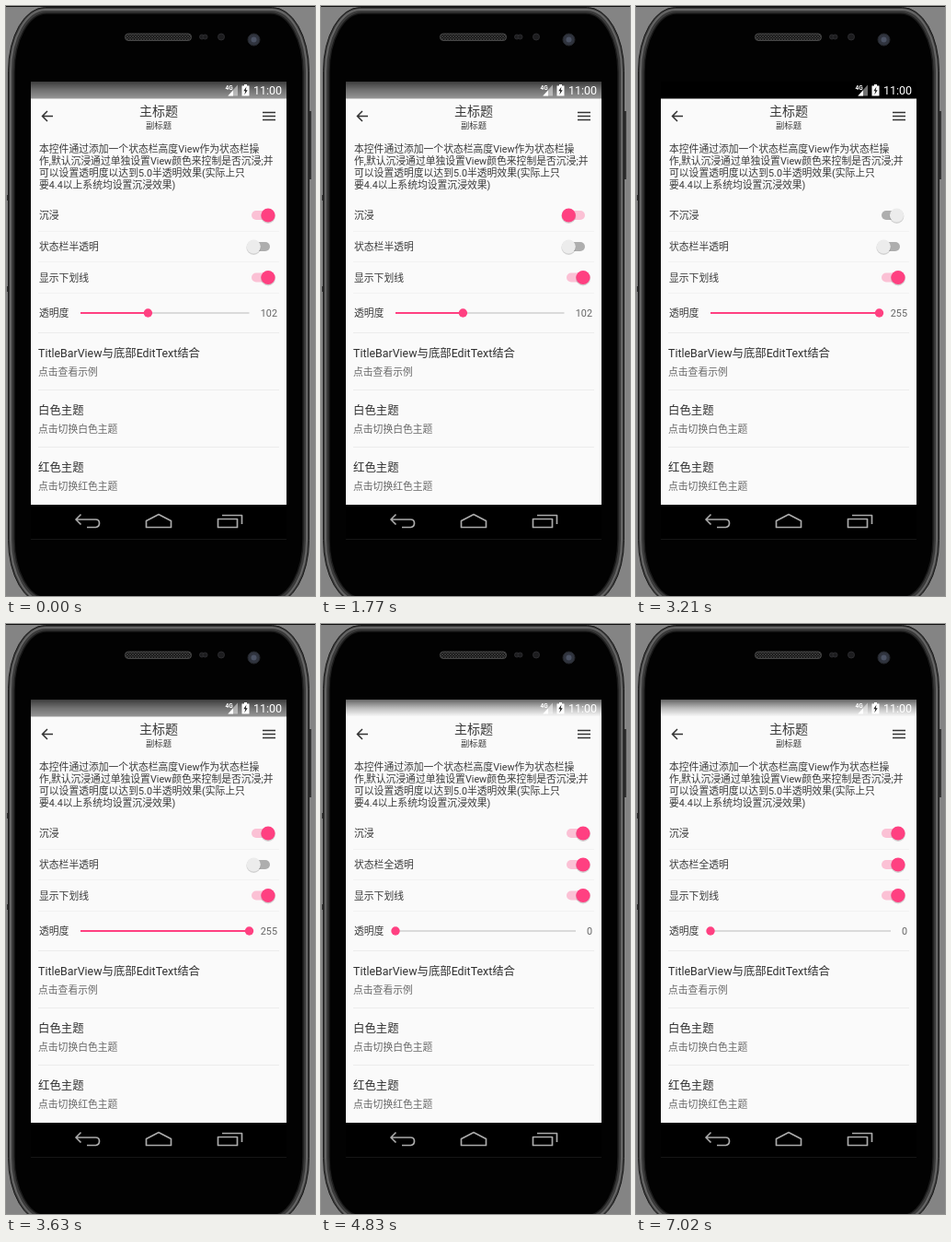
Animation, 336 px wide and 640 px high, one loop 8 s. Source, as an HTML page:

```html
<!DOCTYPE html>
<html lang="zh-CN">
<head>
<meta charset="utf-8">
<style>
  html, body { margin: 0; width: 100%; height: 100%; overflow: hidden; background: #848484; }
  svg { display: block; }
  text { font-family: Roboto, "Noto Sans CJK SC", "Noto Sans CJK", sans-serif; font-size: 10.8px; fill: #3a3a3a; white-space: pre; }
  .head { font-size: 12.4px; fill: #303030; }
  .sub { fill: #6a6a6a; }
  .icon { fill: none; stroke: #333; stroke-width: 1.5; }
  .nav { fill: none; stroke: #aaa; stroke-width: 1.7; stroke-linejoin: round; }
  .white, .white text { fill: #fff; }
</style>
</head>
<body>
<svg id="stage" width="336" height="640" viewBox="0 0 336 640">
  <defs>
    <linearGradient id="shade" x2="0" y2="1">
      <stop offset="0" stop-opacity=".6"/>
      <stop offset=".5" stop-opacity=".25"/>
      <stop offset="1" stop-opacity="0"/>
    </linearGradient>
    <pattern id="mesh" width="3" height="3" patternUnits="userSpaceOnUse">
      <path d="M0 0L3 3M3 0L0 3" stroke="#4a4a4a" stroke-width=".6"/>
    </pattern>
  </defs>

  <!-- phone body -->
  <path d="M0 .5H336" stroke="#111"/>
  <path d="M329 114h3v74h-3zM1 205h3v6H1zM1 304h3v6H1z" fill="#333"/>
  <rect x="2.500" y="1.500" width="327" height="647" rx="40" ry="69" fill="#3a3a3a" stroke="#1c1c1c"/>
  <rect x="5" y="4" width="322" height="642" rx="38" ry="67" fill="none" stroke="#666" stroke-width="2"/>
  <rect x="9" y="8" width="314" height="634" rx="35" ry="64" fill="#020202" stroke="#1c1c1c" stroke-width="1.500"/>
  <rect x="129.500" y="30" width="72" height="7.500" rx="3.500" fill="#161616"/>
  <rect x="129.500" y="30" width="72" height="7.500" rx="3.500" fill="url(#mesh)" stroke="#555" stroke-width=".8"/>
  <g fill="#1d1d1f" stroke="#2c2c2f">
    <circle cx="213" cy="33.500" r="2.500"/>
    <circle cx="216.500" cy="33.500" r="2.500"/>
    <circle cx="234" cy="33.500" r="3.500"/>
  </g>
  <circle cx="269.500" cy="36.500" r="6.500" fill="#30343e" stroke="#24262b"/>
  <circle cx="269.500" cy="36.500" r="3" fill="#4b5263"/>

  <!-- screen -->
  <rect x="27" y="82" width="278" height="496" fill="#000"/>
  <path d="M27 578.500H305" stroke="#151515"/>
  <rect x="27" y="82" width="278" height="459" fill="#fafafa"/>
  <rect id="tint" x="27" y="82" width="278" height="18.500"/>
  <rect x="27" y="82" width="278" height="18.500" fill="url(#shade)"/>
  <g class="white">
    <path d="M252 85.500V97.500H241Z" opacity=".45"/>
    <path d="M247 91.500V97.500H241.500Z"/>
    <text x="238.500" y="91" style="font-size:6.500px;font-weight:700">4G</text>
    <path d="M256.500 86.500h2.500v-1.500h3v1.500h2.500v11h-8z"/>
    <path d="M261.500 87.500l-3.200 4.700h2l-1 4 3.400-5h-2z" fill="#222"/>
    <text x="269" y="96" style="font-size:12.500px">11:00</text>
  </g>
  <path class="icon" d="M51 119.500H39.500M45 114L39.500 119.500L45 125M279 115.500H293M279 119.500H293M279 123.500H293"/>
  <path class="nav" d="M81.500 551.500L76 557L81.500 562.500M76.500 557H97.500Q101.500 557 101.500 561T97.500 565.500H88M152.500 565.500V558.500L166 551.500L179.500 558.500V565.500ZM230.500 556.500H251.500V565.500H230.500ZM235 552.500H256.500V562"/>
  <g id="content"></g>
</svg>
<script>
const content = document.getElementById('content');
const tint = document.getElementById('tint');
const PINK = '#ff4081';

function add(tag, attrs, label = '') {
  const el = document.createElementNS('http://www.w3.org/2000/svg', tag);
  for (const name in attrs) el.setAttribute(name, attrs[name]);
  el.textContent = label;
  return content.appendChild(el);
}
const text = (x, y, label, attrs) => add('text', { x, y, ...attrs }, label);
const line = (x1, x2, y, stroke, width = 1) => add('path', { d: `M${x1} ${y}H${x2}`, stroke, 'stroke-width': width });

text(166, 119.3, '主标题', { 'text-anchor': 'middle', style: 'font-size:14px' });
text(166, 132.5, '副标题', { 'text-anchor': 'middle', style: 'font-size:9.3px' });
['本控件通过添加一个状态栏高度View作为状态栏操',
 '作,默认沉浸通过单独设置View颜色来控制是否沉浸;并',
 '可以设置透明度以达到5.0半透明效果(实际上只',
 '要4.4以上系统均设置沉浸效果)'].forEach((s, i) => text(36, 159 + 13 * i, s));
[244.5, 277.5, 311.5].forEach(y => line(35, 297, y, '#f2f2f2'));
[354.5, 416.5, 478.5].forEach(y => line(35, 297, y, '#ececec'));
[['TitleBarView与底部EditText结合', '点击查看示例'],
 ['白色主题', '点击切换白色主题'],
 ['红色主题', '点击切换红色主题']].forEach(([head, sub], i) => {
  text(35, 380.8 + 62 * i, head, { class: 'head' });
  text(35, 400.8 + 62 * i, sub, { class: 'sub' });
});

function makeSwitch(y, onLabel, offLabel) {
  const label = text(36, y + 4);
  const track = add('rect', { x: 267, y: y - 5, width: 20, height: 10, rx: 5 });
  const shadow = add('circle', { cy: y + 1, r: 7.9, opacity: .16 });
  const thumb = add('circle', { cy: y, r: 7.6 });
  return (on, position) => {
    label.textContent = on ? onLabel : offLabel;
    track.setAttribute('fill', on ? PINK : '#000');
    track.setAttribute('opacity', on ? .3 : .3);
    thumb.setAttribute('fill', on ? PINK : '#ececec');
    for (const c of [shadow, thumb]) c.setAttribute('cx', 269.3 + 15.7 * position);
  };
}
const immersion = makeSwitch(227, '沉浸', '不沉浸');
const clearBar = makeSwitch(261, '状态栏全透明', '状态栏半透明');
const underline = makeSwitch(294.5, '显示下划线', '隐藏下划线');

text(36, 337, '透明度');
const rail = line(81, 265, 333, '#cfcfcf', 1.6);
const filled = line(81, 154, 333, PINK, 2);
const knob = add('circle', { cy: 333, r: 4.7, fill: PINK });
const amount = text(295, 337, '', { 'text-anchor': 'end', style: 'fill:#666' });

function setSlider(value) {
  const end = value > 99 ? 264.5 : 277;
  const x = 81 + (end - 81) * value / 255;
  rail.setAttribute('d', `M81 333H${end}`);
  filled.setAttribute('d', `M81 333H${x}`);
  knob.setAttribute('cx', x);
  amount.textContent = value;
}

function ease(t, from, to) {
  const p = Math.min(1, Math.max(0, (t - from) / (to - from)));
  return (1 - Math.cos(Math.PI * p)) / 2;
}

function draw(now) {
  // The screen refreshes every 30 ms.
  const t = Math.floor(now % 8000 / 30) * 30;
  immersion(t < 2130 || t >= 3630, 1 - ease(t, 870, 1110) + ease(t, 3090, 3240));
  clearBar(t >= 4560, ease(t, 4560, 4830));
  underline(t < 6240 || t >= 6780, 1 - ease(t, 6240, 6450) + ease(t, 6780, 7020));
  setSlider(t < 2130 ? 102 : t < 4560 ? 255 : 0);
  tint.setAttribute('opacity', t >= 4560 ? 0 : t >= 2130 && t < 3630 ? 1 : .4);
  requestAnimationFrame(() => draw(performance.now() - start));
}
const start = performance.now();
draw(0);
</script>
</body>
</html>
```
